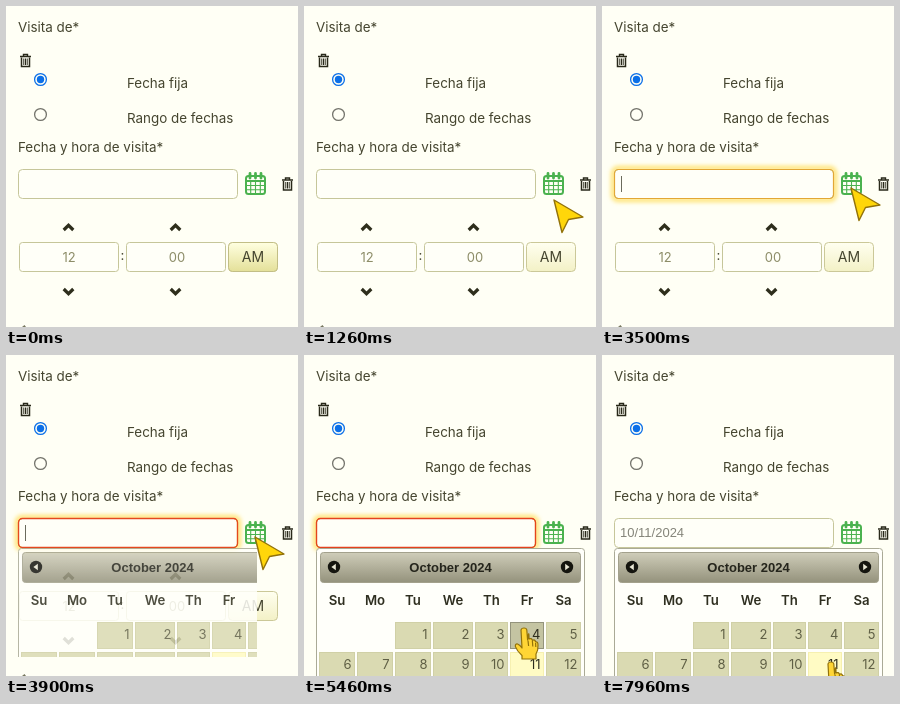
An HTML page for the animation above (8 s loop, 292x321 px).

```html
<!DOCTYPE html>
<html lang="es">
<head>
<meta charset="utf-8">
<title>Fecha y hora de visita</title>
<style>
html, body { margin: 0; width: 100%; height: 100%; overflow: hidden; background: #fffff5; }
svg, .panel { position: absolute; left: 0; top: 0; width: 292px; height: 321px; }
svg { display: block; overflow: hidden; }
text { font: 13.4px Inter, "Open Sans", sans-serif; fill: #45452f; }
.box { fill: #fffff8; stroke: #c6c69a; }
.time { fill: #8d8d68; font-size: 13px; text-anchor: middle; }
.chev { fill: none; stroke: #2e2e1c; stroke-width: 3.2; }
.ring { fill: none; stroke-width: 1.3; }
.date { font: 13px "Liberation Sans", Arial, sans-serif; fill: #85857a; }
.title { font: bold 13px "Liberation Sans", Arial, sans-serif; fill: #25251c; text-anchor: middle; }
.dow { font-size: 13.2px; font-weight: 600; fill: #2f2f20; text-anchor: middle; }
.day { font-size: 13px; fill: #5f5f45; text-anchor: end; }
.dark { fill: #2c2c1e; }

.warm, .focus, .error, .caret, .date, .panel, .hover, .pointer, .arrow, .hand {
  animation: 8s linear infinite;
}
.warm { animation-name: warm; }
.focus { animation-name: focus; }
.error { animation-name: error; }
.caret { animation-name: caret; animation-timing-function: step-end; }
.date { animation-name: date; animation-timing-function: step-end; }
.panel { animation-name: open; }
.hover { animation-name: hover; animation-timing-function: step-end; }
.pointer { animation-name: move; }
.arrow { animation-name: arrow; animation-timing-function: step-end; }
.hand { animation-name: hand; animation-timing-function: step-end; }

@keyframes warm { 0%, 6% { opacity: 1; } 10%, 100% { opacity: 0; } }
@keyframes focus {
  0%, 43.74% { opacity: 0; }
  43.75%, 95.5% { opacity: 1; }
  99%, 100% { opacity: 0; }
}
@keyframes error {
  0%, 45.2% { opacity: 0; }
  49%, 95.5% { opacity: 1; }
  98.5%, 100% { opacity: 0; }
}
@keyframes caret {
  0% { opacity: 0; } 43.75% { opacity: 1; } 64.75% { opacity: 0; }
  85.75% { opacity: 1; } 92.5%, 100% { opacity: 0; }
}
@keyframes date { 0% { opacity: 0; } 95.5%, 100% { opacity: 1; } }
@keyframes open {
  0%, 45.2% { opacity: 0; clip-path: inset(190px 280px 131px 0); }
  47% { opacity: .5; clip-path: inset(190px 140px 66px 0); }
  49.5%, 100% { opacity: 1; clip-path: inset(190px 0 0 0); }
}
@keyframes hover { 0% { opacity: 0; } 64.75% { opacity: 1; } 73.75%, 100% { opacity: 0; } }
@keyframes move {
  0%, 4% { transform: translate(296px, 328px); }
  5.25% { transform: translate(287px, 312px); }
  8.5% { transform: translate(275px, 268px); }
  11.5% { transform: translate(264px, 231px); }
  14.25% { transform: translate(256px, 207px); }
  15.75%, 17.2% { transform: translate(250px, 194px); }
  21.25%, 54.25% { transform: translate(249px, 182px); }
  57.75%, 59.2% { transform: translate(247px, 194px); }
  63.25% { transform: translate(227px, 257px); }
  64.75% { transform: translate(223px, 266px); }
  68.25%, 69.75% { transform: translate(220px, 273px); }
  73.75% { transform: translate(222px, 295px); }
  78.75%, 100% { transform: translate(229px, 307px); }
}
@keyframes arrow { 0% { opacity: 0; } 5.25% { opacity: 1; } 64.75%, 100% { opacity: 0; } }
@keyframes hand { 0% { opacity: 0; } 64.75%, 100% { opacity: 1; } }
</style>
</head>
<body>
<svg viewBox="0 0 292 321">
  <defs>
    <linearGradient id="pale" x2="0" y2="1">
      <stop stop-color="#fffff0"/><stop offset="1" stop-color="#f3f1c6"/>
    </linearGradient>
    <linearGradient id="gold" x2="0" y2="1">
      <stop stop-color="#ffffe0"/><stop offset="1" stop-color="#e4e099"/>
    </linearGradient>
    <linearGradient id="bar" x2="0" y2="1">
      <stop stop-color="#cfcdb9"/><stop offset="1" stop-color="#94927c"/>
    </linearGradient>
    <filter id="blur" x="-10%" y="-50%" width="120%" height="200%"><feGaussianBlur stdDeviation="2.2"/></filter>
    <g id="trash" fill="none" stroke="#29291a">
      <path d="M0 2.5H11M3.5 2V.5H7.5V2" stroke-width="1.4"/>
      <path d="M1.5 3.5V12.4H9.5V3.5" stroke-width="1.5"/>
      <path d="M3.8 4.5V11M5.5 4.5V11M7.2 4.5V11"/>
    </g>
    <path id="up" class="chev" d="M-4.8 3L0-1.7L4.8 3"/>
    <path id="down" class="chev" d="M-4.8-3L0 1.7L4.8-3"/>
  </defs>

  <text x="12" y="26">Visita de*</text>
  <use href="#trash" x="14" y="48"/>
  <circle class="ring" cx="34.5" cy="73.5" r="5.9" stroke="#0b6fe8" fill="none"/>
  <circle cx="34.5" cy="73.5" r="3.7" fill="#0b6fe8"/>
  <text x="121" y="82">Fecha fija</text>
  <circle class="ring" cx="34.5" cy="108.5" r="5.9" stroke="#73736b"/>
  <text x="121" y="117">Rango de fechas</text>
  <text x="12" y="146">Fecha y hora de visita*</text>

  <rect class="focus" x="11" y="162" width="222" height="32" rx="5" fill="none" stroke="#ffe169" stroke-width="4" filter="url(#blur)"/>
  <rect class="box" x="12.5" y="163.5" width="219" height="29" rx="4"/>
  <rect class="focus" x="12.5" y="163.5" width="219" height="29" rx="4" fill="none" stroke="#e2a735" stroke-width="1.2"/>
  <rect class="error" x="12.5" y="163.5" width="219" height="29" rx="4" fill="none" stroke="#e5421d" stroke-width="1.3"/>
  <path class="caret" d="M19.5 170V186" stroke="#6b6b5c"/>
  <text class="date" x="18" y="182">10/11/2024</text>

  <g fill="none" stroke="#4bb24f">
    <rect x="240" y="170" width="19" height="18" rx="2.5" stroke-width="2"/>
    <path d="M240 175H259" stroke-width="2"/>
    <path d="M240 179.5H259M240 183.7H259M244.7 175V188M249.5 175V188M254.3 175V188" stroke-width="1.1"/>
    <path d="M244 167.5V172M249.5 167.5V172M255 167.5V172" stroke-width="2.8" stroke-linecap="round"/>
  </g>
  <use href="#trash" x="276" y="171.5"/>

  <rect class="box" x="13.5" y="236.5" width="99" height="29" rx="3"/>
  <rect class="box" x="120.5" y="236.5" width="99" height="29" rx="3"/>
  <text class="time" x="63" y="255.5">12</text>
  <text class="time" x="171" y="255.5">00</text>
  <text x="114.5" y="254">:</text>
  <use href="#up" x="62.5" y="221"/><use href="#up" x="169.5" y="221"/>
  <use href="#down" x="62.5" y="286"/><use href="#down" x="169.5" y="286"/>

  <rect x="222.5" y="236.5" width="49" height="29" rx="4" fill="url(#pale)" stroke="#cbc898"/>
  <rect class="warm" x="222.5" y="236.5" width="49" height="29" rx="4" fill="url(#gold)" stroke="#c2be86"/>
  <text x="247" y="255.5" text-anchor="middle" style="font-size:14px">AM</text>
  <path d="M16 321L18.5 319L20 321" fill="#77775f"/>
</svg>

<div class="panel">
  <svg viewBox="0 0 292 321">
    <rect x="12.5" y="193.5" width="268" height="140" rx="3" fill="#fffffa" stroke="#aaaa96"/>
    <rect x="16.5" y="197.5" width="260" height="30" rx="3" fill="url(#bar)" stroke="#a3a18c"/>
    <text class="title" x="146.5" y="217">October 2024</text>
    <circle cx="30" cy="212" r="6.2" fill="#15150f"/>
    <path d="M31.8 208.8L27.4 212L31.8 215.2Z" fill="#e8e6d4"/>
    <circle cx="263" cy="212" r="6.2" fill="#15150f"/>
    <path d="M261.2 208.8L265.6 212L261.2 215.2Z" fill="#e8e6d4"/>
    <g id="days"></g>
  </svg>
</div>

<svg viewBox="0 0 292 321">
  <g class="pointer" stroke="#92720a" stroke-linejoin="round">
    <path class="arrow" d="M0 0L29 17L14.5 19.5L8 32.5Z" fill="#ffd60a" stroke-width="1.4"/>
    <g class="hand" fill="#ffd535" stroke-width="1.2">
      <path d="M-3 2Q-2.7 0 0 0Q2.6 0 2.8 2L3.6 12Q5-.0 5 11Q7.6 9.6 8.4 12.4Q11 11 11.6 14Q14 13.4 14 17Q14.4 22 12 26V31H-2V27.5Q-7 23-8.6 18.6Q-9 15.6-6.4 16Q-4 17-2 20Z"/>
      <path d="M4 12.5L4.6 18M8.4 13L8.8 18.5M11.6 15L11.8 19" fill="none"/>
    </g>
  </g>
</svg>

<script>
const names = ["Su", "Mo", "Tu", "We", "Th", "Fr", "Sa"];
const edges = [14, 52, 90, 128, 170, 205, 241, 278];
const layer = document.getElementById("days");

function add(tag, attrs, label) {
  const el = document.createElementNS("http://www.w3.org/2000/svg", tag);
  for (const key in attrs) el.setAttribute(key, attrs[key]);
  if (label) el.textContent = label;
  layer.append(el);
}

function cell(day) {
  const slot = day + 1, col = slot % 7, row = Math.floor(slot / 7);
  const today = day === 11, y = 267 + row * 30;
  const rect = { x: edges[col] + 1.5, y: y + .5, width: edges[col + 1] - edges[col] - 3, height: 26 };
  const spot = { x: edges[col + 1] - 4.5, y: y + 16.5 };
  add("rect", { ...rect, fill: today ? "#fffbc4" : "#dadab2", stroke: today ? "#f6f0b0" : "#d0d0a6" });
  add("text", { ...spot, class: today ? "day dark" : "day" }, day);
  if (day === 4) {
    add("rect", { ...rect, class: "hover", fill: "#c4c4a2", stroke: "#94947c" });
    add("text", { ...spot, class: "day dark hover" }, day);
  }
}

names.forEach((name, i) => add("text", { x: (edges[i] + edges[i + 1]) / 2, y: 250, class: "dow" }, name));
for (let day = 1; day <= 12; day++) cell(day);
</script>
</body>
</html>
```
